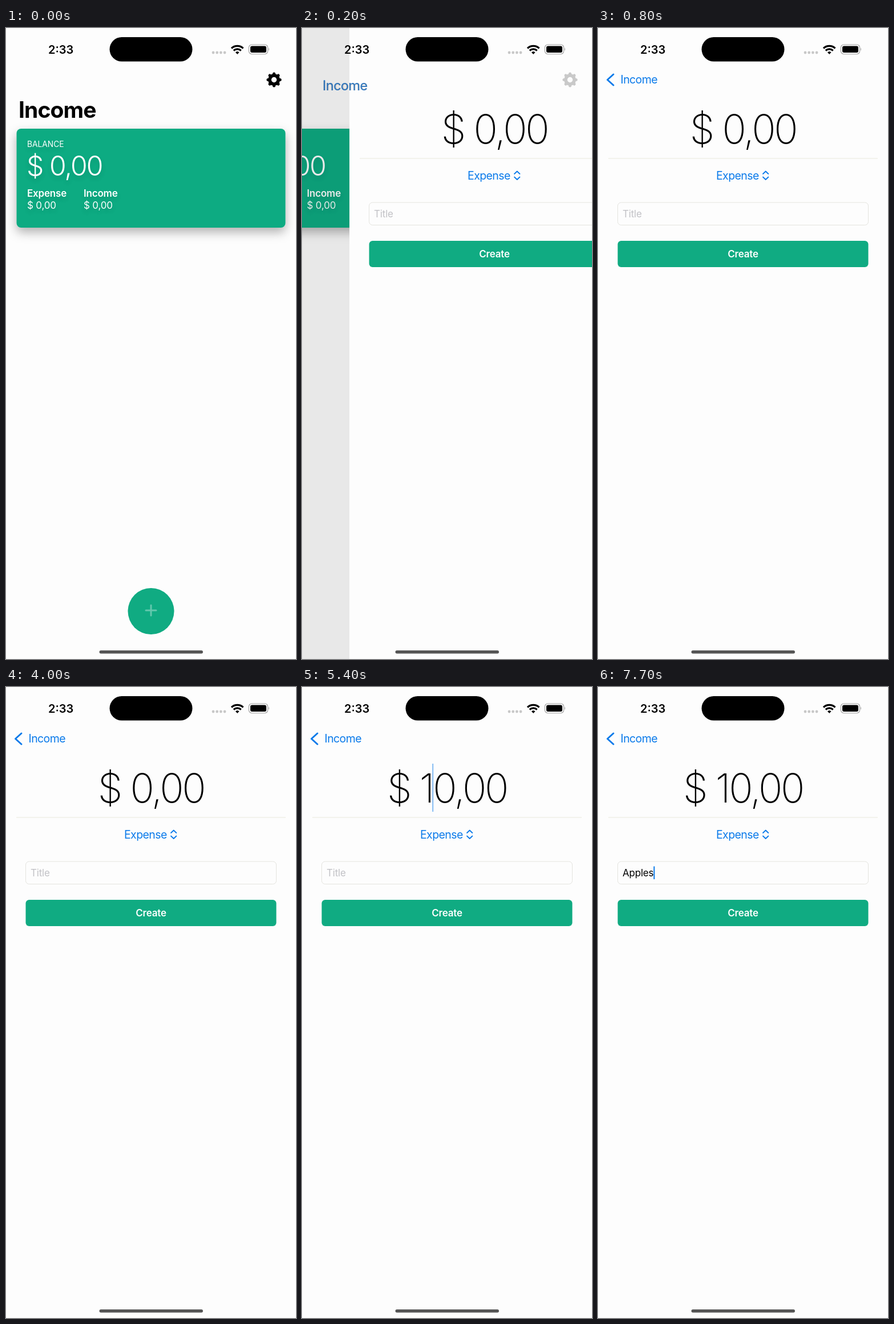
An HTML page for the animation above (8000 ms loop, 508 by 1103 pixels).

```html
<!DOCTYPE html>
<html lang="en">
<head>
<meta charset="utf-8">
<title>Income tracker</title>
<style>
  html, body { margin: 0; width: 100%; height: 100%; overflow: hidden; background: #fdfdfd; }
  svg { display: block; width: 508px; height: 1103px; font-family: Inter, sans-serif; }
  text { white-space: pre; }
  .green { fill: #10ab82; }
  .blue { fill: #0a7aea; }
  .line { fill: none; stroke: #0a7aea; stroke-linecap: round; stroke-linejoin: round; }
  .body { font-size: 19.5px; letter-spacing: -.6px; }
  .small { font-size: 17px; letter-spacing: -.2px; }
  .strong { font-weight: 600; }
  .card text { fill: #fff; text-shadow: 0 5px 9px rgba(0, 0, 0, .12); }
</style>
</head>
<body>
<svg viewBox="0 0 508 1103">
  <defs>
    <filter id="shadow" x="-20%" y="-30%" width="140%" height="160%">
      <feDropShadow dx="0" dy="8" stdDeviation="9" flood-opacity=".3"/>
    </filter>
  </defs>

  <g id="list">
    <rect width="508" height="1103" fill="#fdfdfd"/>
    <g class="card">
      <rect class="green" x="18.5" y="176" width="471" height="173" rx="8" filter="url(#shadow)"/>
      <text x="37" y="207.500" font-size="13.8">BALANCE</text>
      <text x="36" y="257.500" font-size="48" font-weight="300" letter-spacing="-1.9">$ 0,00</text>
      <text class="small strong" x="37" y="295">Expense</text>
      <text class="small" x="37" y="316">$ 0,00</text>
      <text class="small strong" x="136" y="295">Income</text>
      <text class="small" x="136" y="316">$ 0,00</text>
    </g>
    <circle class="green" cx="254" cy="1019.500" r="40.5"/>
    <path d="M245 1018h18M254 1009v18" stroke="#fff" stroke-opacity=".35" stroke-width="3" stroke-linecap="round"/>
  </g>
  <rect id="dim" width="508" height="1103"/>

  <g id="form">
    <rect width="508" height="1103" fill="#fdfdfd"/>
    <text id="amount" x="254" y="202" font-size="70" font-weight="200" letter-spacing="-3.2" text-anchor="middle"></text>
    <rect id="amountCaret" class="blue" y="134" width="2" height="84"/>
    <path d="M18 228h472" stroke="#e8e8dd"/>
    <text class="body blue" x="207" y="265">Expense</text>
    <path class="line" stroke-width="1.8" d="M289 255l4.700-4.500 4.700 4.500M289 260.500l4.700 4.500 4.700-4.500"/>
    <rect x="34.5" y="305" width="439" height="39.500" rx="6" fill="none" stroke="#e4e4df"/>
    <text id="entry" class="small" x="43" y="331"></text>
    <rect id="entryCaret" class="blue" y="313.500" width="2" height="22.500"/>
    <rect class="green" x="34.5" y="372" width="439" height="46" rx="6"/>
    <text class="small strong" x="254" y="401" fill="#fff" text-anchor="middle">Create</text>
  </g>

  <g id="gear" transform="translate(469.500 90.500)">
    <circle r="7.600" fill="none" stroke="#000" stroke-width="5.800"/>
    <g id="teeth" stroke="#000" stroke-width="5" stroke-linecap="round"></g>
  </g>
  <path id="chevron" class="line" stroke-width="3" d="M27 81l-10.500 9.500 10.500 9.500"/>
  <text id="backLabel" class="body blue">Income</text>
  <text id="heading" font-size="39" font-weight="700" letter-spacing="-.9">Income</text>

  <g id="status">
    <text class="strong" x="74" y="45" font-size="20">2:33</text>
    <rect x="181.500" y="16" width="145" height="42.500" rx="21.250"/>
    <path d="M363 43h21" stroke="#c8c8c8" stroke-width="4.800" stroke-linecap="round" stroke-dasharray="0 6.700"/>
    <g fill="none" stroke="#000" stroke-width="3.200">
      <path d="M395 35.500a15 15 0 0 1 20.500 0M398.800 39.500a9.500 9.500 0 0 1 12.900 0"/>
    </g>
    <path d="M405.250 46l-3.300-3.400a4.800 4.800 0 0 1 6.600 0z"/>
    <rect x="425.500" y="29" width="33" height="16.500" rx="5" fill="none" stroke="#a0a0a0" stroke-width="1.200"/>
    <rect x="428" y="31.500" width="28" height="11.500" rx="3"/>
    <path d="M460 34.500q2 2.700 0 5.400z" fill="#a0a0a0"/>
  </g>
  <rect x="163.500" y="1088" width="181.500" height="5.500" rx="2.750" fill="#555"/>
</svg>
<script>
const LOOP = 8000, STEP = 100, WIDTH = 508;
const $ = id => document.getElementById(id);
const clamp = v => Math.min(1, Math.max(0, v));
const mix = (a, b, p) => a + (b - a) * p;
const ramp = (t, from, to) => clamp((t - from) / (to - from));

// Critically damped spring, running from 0 to 1.
function spring(t, start, rate) {
  const x = Math.max(0, t - start) / 1000 * rate;
  return 1 - (1 + x) * Math.exp(-x);
}

function place(id, x, y, scale, opacity) {
  $(id).setAttribute('transform', `translate(${x} ${y}) scale(${scale})`);
  $(id).setAttribute('opacity', opacity);
}

function placeCaret(id, x, opacity) {
  $(id).setAttribute('x', x);
  $(id).setAttribute('opacity', opacity);
}

function drawNavigation(t) {
  const slide = t >= 600 ? 1 : spring(t, 37, 20);
  const morph = t >= 600 ? 1 : spring(t, 42, 19);
  place('list', -0.3 * WIDTH * slide, 0, 1, 1);
  place('form', WIDTH * (1 - slide), 0, 1, 1);
  $('dim').setAttribute('opacity', 0.1 * slide);

  const x = mix(22, 39.5, morph), y = mix(157, 97, morph);
  const shrink = 64 / 134;
  place('heading', x, y, mix(1, shrink, morph), 1 - morph);
  place('backLabel', x, y, mix(1 / shrink, 1, morph), morph);
  $('gear').setAttribute('opacity', 1 - morph);
  $('chevron').setAttribute('opacity', ramp(morph, 0.85, 1));
}

function drawAmount(t) {
  const typed = t >= 4700;
  const amount = $('amount');
  amount.textContent = typed ? '$ 10,00' : '$ 0,00';
  const caretX = amount.getStartPositionOfChar(typed ? 3 : 2).x;
  placeCaret('amountCaret', caretX - 1, ramp(t, 4000, 4200) * (1 - ramp(t, 5300, 5500)));
}

function drawEntry(t) {
  const letters = t < 7400 ? 0 : [2, 4, 5, 6][Math.min(3, Math.floor((t - 7400) / 100))];
  const entry = $('entry');
  entry.textContent = 'Apples'.slice(0, letters) || 'Title';
  entry.setAttribute('fill', letters ? '#000' : '#c2c2c6');
  const caretX = letters ? 43 + entry.getComputedTextLength() : 43;
  const blink = 1 - ramp(t, 6300, 6600) + ramp(t, 6900, 7200);
  placeCaret('entryCaret', caretX, ramp(t, 5600, 5900) * blink);
}

function frame(now) {
  const t = Math.floor(now % LOOP / STEP) * STEP;
  drawNavigation(t);
  drawAmount(t);
  drawEntry(t);
  requestAnimationFrame(frame);
}

$('teeth').innerHTML = Array.from({ length: 8 }, (_, i) =>
  `<path d="M0-8.500V-10.600" transform="rotate(${i * 45})"/>`).join('');
const begin = performance.now();
requestAnimationFrame(now => frame(Math.max(0, now - begin)));
</script>
</body>
</html>
```
